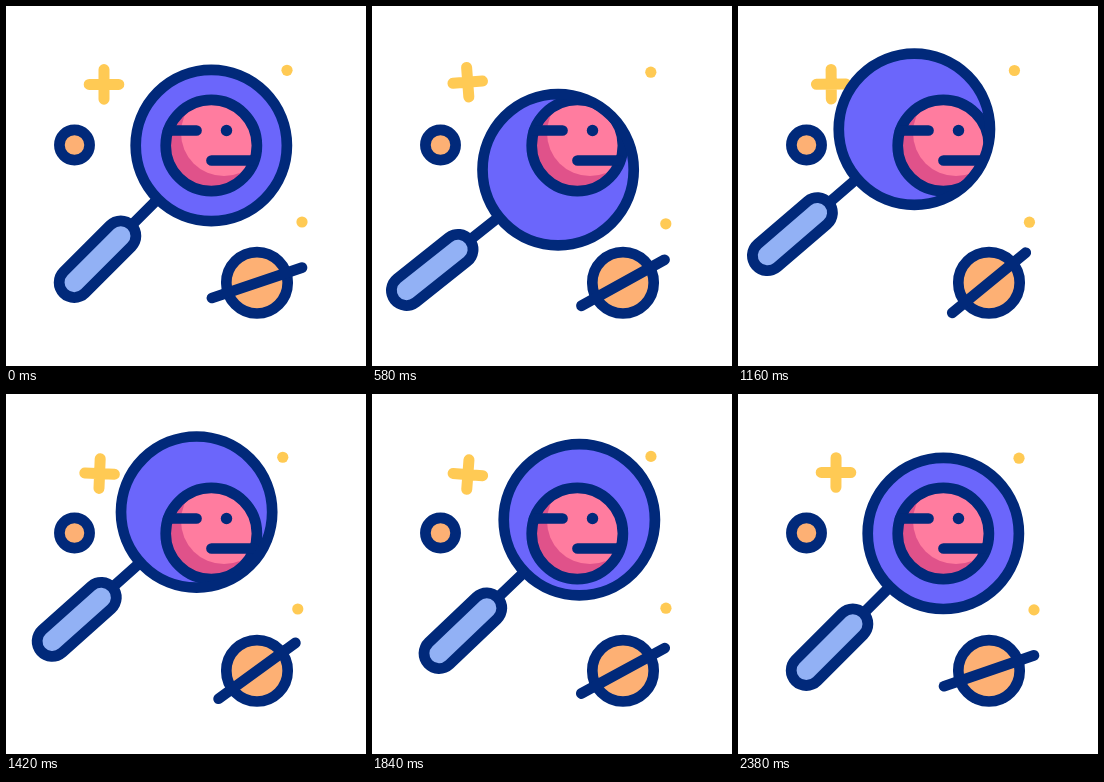
Animation, 360 px wide and 360 px high, one loop 2.4 s. Source, as an HTML page:

```html
<!DOCTYPE html>
<html lang="en">
<head>
<meta charset="utf-8">
<title>Magnifier and planets</title>
<style>
  html, body { margin: 0; width: 100%; height: 100%; overflow: hidden; background: #fff; }
  svg { display: block; width: 100vw; height: 100vh; }
  .line { stroke: #01297a; stroke-width: 10.7; stroke-linecap: round; fill: none; }
  .line.orange { fill: #fdb074; }
  .line.shell { stroke-width: 41; }
  .line.grip { stroke: #92b1f5; stroke-width: 19.4; }
  .yellow { fill: #ffca54; }
  .plus { stroke: #ffca54; stroke-width: 11; stroke-linecap: round; }
</style>
</head>
<body>
<svg viewBox="0 0 360 360">
  <defs>
    <clipPath id="lensClip"><circle id="lensHole" r="75.6"/></clipPath>
    <clipPath id="faceClip"><circle cx="205.3" cy="139.5" r="45.6"/></clipPath>
  </defs>

  <path id="plus" class="plus" d="M-14.8 0H14.8M0-14.8V14.8"/>
  <circle id="dotA" class="yellow" r="5.6"/>
  <circle id="dotB" class="yellow" r="5.6"/>

  <circle class="line orange" cx="68.5" cy="139" r="15.1"/>
  <circle class="line orange" cx="251" cy="276.8" r="30.7"/>
  <path id="ring" class="line" d="M-47.5 0H47.5"/>

  <g id="handle">
    <path class="line" d="M-54 54L-92 92"/>
    <path class="line shell" d="M-90.5 90.5L-137 137"/>
    <path class="line grip" d="M-90.5 90.5L-137 137"/>
  </g>

  <g clip-path="url(#lensClip)">
    <rect width="360" height="360" fill="#6b66fb"/>
    <g clip-path="url(#faceClip)">
      <rect x="150" y="85" width="110" height="110" fill="#e0528a"/>
      <circle cx="218" cy="127" r="43" fill="#ff7c9f"/>
    </g>
    <circle class="line" cx="205.3" cy="139.5" r="45.6"/>
    <path class="line" d="M162 124.5H190.5M205.5 154.5H248"/>
    <circle cx="220.5" cy="124.5" r="5.7" fill="#01297a"/>
  </g>
  <circle id="lensRim" class="line" r="75.6"/>
</svg>
<script>
const LOOP = 2400, SWEEP = 2160;   // the lens rests between SWEEP and LOOP
const PATH = [[205.3, 139.4], [196, 165.5], [180.5, 157.5], [174, 127], [191.5, 118], [206.7, 124.5]];
const $ = id => document.getElementById(id);

// Point on the closed smooth curve through PATH, p from 0 to 1.
function lensAt(p) {
  const n = PATH.length, i = Math.floor(p * n), u = p * n - i;
  const [a, b, c, d] = [-1, 0, 1, 2].map(k => PATH[(i + k + n) % n]);
  return [0, 1].map(k => b[k] + u / 2 * (c[k] - a[k]
    + u * (2 * a[k] - 5 * b[k] + 4 * c[k] - d[k]
    + u * (3 * b[k] - a[k] - 3 * c[k] + d[k]))));
}

// Straight rise from 0 to 1 at peak, then back to 0 at end.
const swing = (t, peak, end) => Math.max(0, Math.min(t / peak, (end - t) / (end - peak)));

function place(id, x, y, turn = 0) {
  $(id).setAttribute('transform', `translate(${x} ${y}) rotate(${turn})`);
}

function draw(t) {
  const [x, y] = lensAt(t < SWEEP ? t / SWEEP : 0);
  place('lensHole', x, y);
  place('lensRim', x, y);
  place('handle', x, y, 6.7 * swing(t, 600, SWEEP));
  place('ring', 251, 276.8, -18.6 - 21.4 * swing(t, LOOP / 2, LOOP));

  const w = 2 * Math.PI * t / LOOP, c = Math.cos(w), s = Math.sin(w);
  place('plus', 95.6 + 2.4 * c, 78.4 - 2.2 * s, -4.3 * s);
  place('dotA', 278.7 + 2.3 * c, 64.3 + 1.9 * s);
  place('dotB', 293.7 + 2.3 * c, 216 + 1.8 * s);
}

const start = performance.now();
function tick() {
  draw((performance.now() - start) % LOOP);
  requestAnimationFrame(tick);
}
tick();
</script>
</body>
</html>
```
